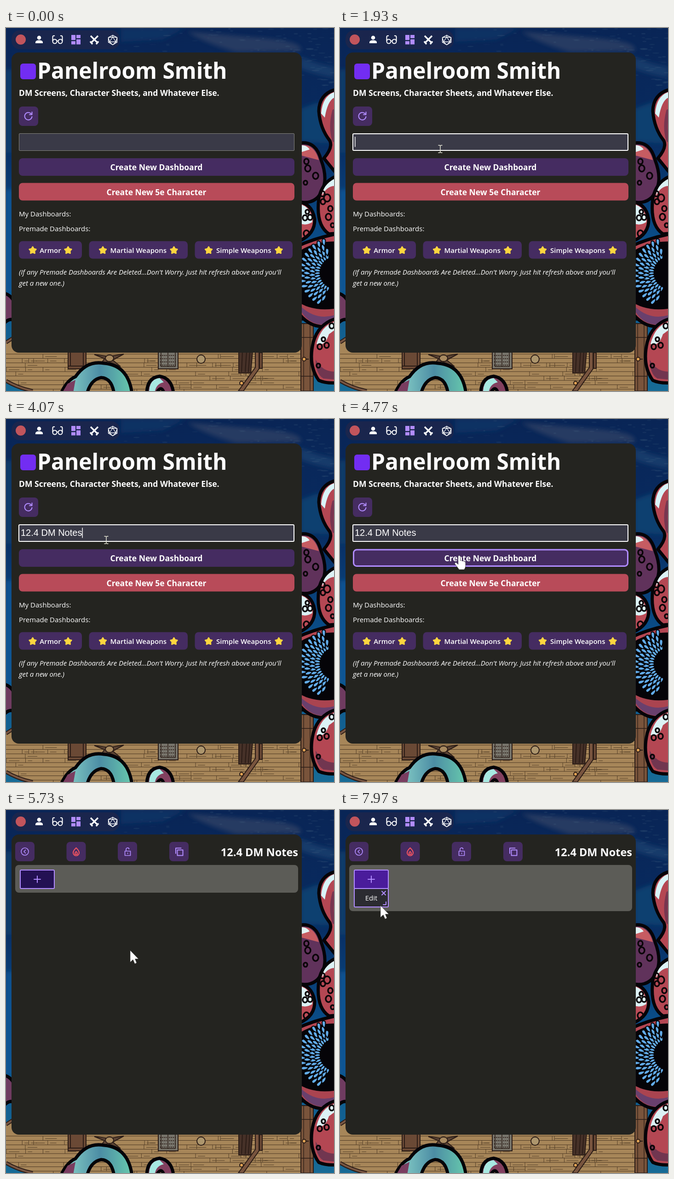
Animation, 713 px wide and 786 px high, one loop 8 s. Source, as an HTML page:

```html
<!DOCTYPE html>
<html lang="en">
<head>
<meta charset="utf-8">
<title>Panelroom Smith</title>
<style>
  html, body { margin: 0; width: 100%; height: 100%; overflow: hidden; background: #092757; }
  svg { display: block; width: 713px; height: 786px; }
  text { font: 15px "Open Sans", "Noto Sans", sans-serif; fill: #fff; white-space: pre; }
  .bold { font-weight: 700; font-size: 17.5px; }
  .semi { font-weight: 600; }
  .mid { text-anchor: middle; }
  .ink { stroke: #050408; stroke-width: 7; stroke-linejoin: round; stroke-linecap: round; }
  .ring { fill: none; stroke: #0a0508; stroke-width: 3.5; }
  .wood { stroke: #2b1c16; stroke-width: 2; }
  .btn { fill: #452c61; }
  .icon { fill: none; stroke: #b18cff; stroke-width: 2; stroke-linecap: round; stroke-linejoin: round; }
  .white { fill: none; stroke: #fff; stroke-width: 2; stroke-linejoin: round; }
</style>
</head>
<body>
<svg viewBox="0 0 713 786">
  <defs>
    <linearGradient id="sea" x2="0" y2="1">
      <stop offset="0" stop-color="#092556"/>
      <stop offset=".3" stop-color="#082b60"/>
      <stop offset=".6" stop-color="#0a4f8a"/>
      <stop offset="1" stop-color="#176b96"/>
    </linearGradient>
    <filter id="soft"><feGaussianBlur stdDeviation="5"/></filter>
    <linearGradient id="limb"><stop offset="0" stop-color="#8fd9cd"/><stop offset=".55" stop-color="#4c8da4"/><stop offset="1" stop-color="#67c9ad"/></linearGradient>
  </defs>

  <!-- Sea -->
  <rect width="713" height="786" fill="url(#sea)"/>
  <g filter="url(#soft)">
    <path d="M395 8Q470 14 560 22T640 50L500 52Q430 32 395 8Z" fill="#273a62"/>
    <path d="M640 62Q680 80 713 84V108Q670 100 640 88Z" fill="#153a6b"/>
    <path d="M250 0H390L340 25 250 30Z" fill="#0d3263"/>
    <path d="M640 175L680 160 705 250 640 246Z" fill="#0c3f70"/>
    <path d="M0 90H12V270H0Z" fill="#0a3f6c"/>
    <path d="M0 350H14V570H0Z" fill="#0d5594"/>
  </g>
  <g id="specks"></g>

  <!-- Ship -->
  <path d="M0 680L20 662H645V786H58Q20 780 0 764Z" fill="#a78659"/>
  <g id="planks" stroke="#4c3823"></g>
  <path d="M0 681L20 668M0 764Q25 779 58 786" fill="none" stroke="#2b1c16" stroke-width="8"/>
  <path d="M0 681L20 668M0 764Q25 779 58 786" fill="none" stroke="#795743" stroke-width="4"/>
  <g class="wood">
    <path d="M135 700H174V738H135Z" fill="#6a4935"/>
    <path d="M140 700V732H168V700M135 732H174" fill="none"/>
    <path d="M192 707L224 711 256 706 232 719 249 733 221 722 202 733 214 716Z" fill="#5e4636"/>
    <ellipse cx="225" cy="715" rx="9" ry="7" fill="#a88a60"/>
    <path d="M331 700H374V738H331Z" fill="#77746b"/>
    <path d="M337 700V733H368V700M352 700V733" fill="none" stroke-width="1.5"/>
    <path d="M335 709H371M335 716H371M335 723H371M335 730H371" stroke-dasharray="2 2"/>
    <circle cx="424" cy="717" r="9" fill="#ad966d"/>
    <path d="M506 700H536L532 747H506Z" fill="#463128"/>
    <path d="M514 700L512 745M523 700L520 745M530 700L527 745" fill="none"/>
    <path d="M542 700H550V738L516 786H505L542 735Z" fill="#79553f"/>
    <path d="M551 703H557V737H551Z" fill="#6a4935"/>
    <path d="M641 640H668V786H641Z" fill="#79543b"/>
    <path d="M647 640V786M661 640V786M641 670H668M641 754H668" fill="none" stroke-width="1.3"/>
    <circle cx="648" cy="717" r="4" fill="#e0a253"/><path d="M651 717H658"/>
    <circle cx="512" cy="769" r="4" fill="#e0a253"/>
  </g>

  <!-- Sea monster -->
  <g class="ink">
    <path d="M119 792Q132 763 151 755Q176 719 213 726Q266 730 274 792H235Q230 758 207 757Q184 761 176 792Z" fill="url(#limb)"/>
    <path d="M122 790L134 770 151 762 146 790Z" fill="#7a3d60" stroke="none"/>
    <path d="M306 792Q306 757 334 754Q360 758 364 790L344 792Q338 770 326 792Z" fill="#82405f"/>
    <path d="M311 790Q311 760 334 758L343 767Q326 770 323 790Z" fill="#a7e9e2" stroke="none"/>
    <path d="M-6 574Q8 576 16 590V632Q5 628 -6 642Z" fill="#6f3b60"/>

    <path d="M722 132Q681 140 680 180Q683 218 704 244Q711 259 691 282L722 320Z" fill="#b44753"/>
    <path d="M713 139Q688 148 685 185L693 194Q699 158 713 151Z" fill="#d9f4f8" stroke="none"/>
    <path d="M713 180Q704 215 713 243" fill="none" stroke="#783650" stroke-width="8"/>
    <path d="M630 251Q673 239 685 286Q699 323 689 348Q674 387 630 375Z" fill="#60325b"/>
    <path d="M638 254Q670 249 680 286L638 275Z" fill="#c65c62" stroke="none"/>
    <path d="M638 254Q653 252 660 263L638 270Z" fill="#e2f4f5" stroke="none"/>
    <path d="M630 376Q665 377 671 414Q672 446 638 461Z" fill="#bb4c57"/>
    <path d="M638 382Q662 385 666 420Q653 429 638 423Z" fill="#dcf2f5" stroke="none"/>
    <path d="M722 319Q687 332 680 369Q673 427 702 446L722 444Z" fill="#b44753"/>
    <path d="M713 327Q689 340 687 363Q697 343 713 342Z" fill="#dcf2f5" stroke="none"/>
    <path d="M632 473Q670 455 722 445V630H632Z" fill="#b44753"/>
    <path d="M632 491Q670 463 722 466V603Q670 608 632 583Z" fill="#050408"/>
    <path d="M632 587Q667 613 722 603V641Q665 661 632 612Z" fill="#aa4450"/>
    <path d="M642 604Q674 633 713 622V639Q666 652 642 614Z" fill="#69406d" stroke="none"/>
    <path d="M722 628Q680 638 668 680Q656 730 680 763Q695 770 722 768Z" fill="#b44753"/>
    <path d="M713 637Q685 645 675 684Q693 691 702 663L713 655Z" fill="#dcf2f5" stroke="none"/>
    <path d="M673 718Q674 750 690 759L713 761V744Q688 744 673 718Z" fill="#713650" stroke="none"/>
  </g>
  <g id="petals" fill="#62acea" stroke="#050408" stroke-width="2"></g>
  <ellipse cx="713" cy="530" rx="31" ry="34" fill="#050408"/>
  <g id="suckers" class="ring"></g>

  <!-- Navigation -->
  <rect x="12" y="5" width="235" height="41" rx="18" fill="#20264a" opacity=".75"/>
  <circle cx="32" cy="25" r="11" fill="#c2555c"/>
  <g fill="#fff">
    <circle cx="72" cy="21" r="4.3"/><path d="M64 33V31Q64 26.500 72 26.500T80 31V33Z"/>
  </g>
  <g class="white">
    <circle cx="106" cy="29" r="4.500"/><circle cx="118" cy="29" r="4.500"/>
    <path d="M101.500 28V19Q102 16 106 17M122.500 28V19Q122 16 118 17M110.500 28H113.500"/>
    <path d="M184 17L200 33M200 17L184 33M183 29L188 35M201 29L196 35" stroke-width="3.400"/>
    <path d="M232 15.500L241.500 20.500V31L232 36.500 222.500 31V20.500ZM232 19.500L239 30H225ZM232 15.500V19.500M222.500 20.500L232 19.500 241.500 20.500 239 30 232 36.500 225 30ZM222.500 31L225 30M241.500 31L239 30" stroke-width="1.300"/>
  </g>
  <path d="M142 15H151V26H142ZM153 15H162V22H153ZM142 28.500H151V35.500H142ZM153 24.500H162V35.500H153Z" fill="#b18cff"/>

  <rect x="12" y="53" width="631" height="650" rx="16" fill="#242420"/>

  <!-- Start screen -->
  <g id="home">
    <rect x="31" y="77" width="34" height="34" rx="6" fill="#722df2"/>
    <text x="68" y="110" style="font-size:47.800px" class="bold">Panelroom Smith</text>
    <text x="28" y="146.500" class="bold">DM Screens, Character Sheets, and Whatever Else.</text>
    <rect class="btn" x="28" y="170" width="42" height="42" rx="8"/>
    <path class="icon" d="M56.500 192A8 8 0 1 1 54.500 185.500L56.500 187.500M56.500 182V187.500H51" stroke-width="1.700"/>
    <rect id="field" fill="#3a3a47"/>
    <text id="entry" x="32" y="253" style="font:20px 'Liberation Sans',Arial,sans-serif"></text>
    <rect id="caret" y="235.500" width="1.500" height="22" fill="#fff"/>
    <rect class="btn" x="28" y="282" width="599" height="38" rx="8"/>
    <rect id="createRing" x="29.500" y="283" width="596" height="35.500" rx="7" fill="none" stroke="#b18cff" stroke-width="3"/>
    <text x="327" y="308" class="bold mid">Create New Dashboard</text>
    <rect x="28" y="335.500" width="599" height="38" rx="8" fill="#b84b59"/>
    <text x="327" y="361.500" class="bold mid">Create New 5e Character</text>
    <text x="28" y="408">My Dashboards:</text>
    <text x="28" y="440">Premade Dashboards:</text>
    <g id="premade"></g>
    <g font-style="italic">
      <text x="28" y="533.500" style="font-style:italic">(If any Premade Dashboards Are Deleted...Don't Worry. Just hit refresh above and you'll</text>
      <text x="28" y="557.500" style="font-style:italic">get a new one.)</text>
    </g>
  </g>

  <!-- Dashboard screen -->
  <g id="board">
    <g class="btn">
      <rect x="20" y="69" width="42" height="42" rx="8"/><rect x="131.500" y="69" width="42" height="42" rx="8"/>
      <rect x="243" y="69" width="42" height="42" rx="8"/><rect x="355" y="69" width="42" height="42" rx="8"/>
    </g>
    <g class="icon" style="stroke-width:1.700">
      <circle cx="41" cy="90" r="8"/><path d="M42.500 86.500L39 90 42.500 93.500"/>
      <path d="M152.500 82Q159 88 159 92.500A6.500 6.500 0 0 1 146 92.500Q146 88 152.500 82ZM152.500 90Q156 93 154.500 96H150.500Q149 93 152.500 90Z" stroke="#ee5361" stroke-width="2.200"/>
      <path d="M258.500 89H270.500V98.500H258.500ZM261 89V85.500A3.300 3.300 0 0 1 267.500 84.500M264.500 93V94.500"/>
      <path d="M372.500 86.500H384.500V98.500H372.500ZM369 94V82.500H380.500" stroke-width="2"/>
    </g>
    <text x="635" y="100" text-anchor="end" class="bold" style="font-size:23.500px">12.4 DM Notes</text>
    <rect id="tray" x="20" y="119" width="615" rx="8" fill="#5c5c57"/>
    <rect id="add" class="icon" x="31" y="130" width="74" height="40" rx="2"/>
    <path class="icon" d="M61 150H75M68 143V157"/>
    <g id="tile">
      <rect class="icon" x="31" y="170" width="74" height="40" rx="2" style="fill:#2b2b31"/>
      <text x="68" y="196" class="mid">Edit</text>
      <path class="icon" d="M91 176L99 184M99 176L91 184M94 205H100V199" stroke-width="1.700"/>
    </g>
  </g>

  <!-- Pointers, each with its hot spot at 0,0 -->
  <g id="pointer">
    <path id="arrow" d="M0 0V25.500L6 20 10 29 14 27 10.500 18.500H18Z" fill="#fff" stroke="#333" stroke-width=".6"/>
    <path id="beam" d="M-4.500 -8H-1.500L0 -7 1.500 -8H4.500M0 -7V7M-4.500 8H-1.500L0 7 1.500 8H4.500" fill="none" stroke="#e8e8d8" stroke-width="1.500"/>
    <path id="hand" d="M-2 2Q0 -1 2.500 2V12L5 11 7 13 9.500 12 11 14Q14 13 14 17V24Q13 29 11 31H0Q-4 25 -9 19Q-10 15 -6 16L-2 20Z" fill="#fff" stroke="#333" stroke-width=".6"/>
  </g>
</svg>

<script>
const $ = id => document.getElementById(id);
const show = (id, on) => $(id).style.display = on ? '' : 'none';
const set = (id, attrs) => Object.entries(attrs).forEach(([k, v]) => $(id).setAttribute(k, v));
const repeat = (n, draw) => Array.from({ length: n }, (_, i) => draw(i)).join('');

let seed = 7;
const random = () => (seed = seed * 16807 % 2147483647) / 2147483647;

// Scenery built from simple rules
$('specks').innerHTML = repeat(90, i => {
  const x = i < 65 ? 260 + random() * 453 : 642 + random() * 71;
  const y = i < 65 ? random() * 52 : 53 + random() * 80;
  return `<ellipse cx="${x}" cy="${y}" rx="${2 + random() * 7}" ry="1.5" fill="#52718c" opacity="${.05 + random() * .15}"/>`;
});
$('planks').innerHTML = repeat(9, row => {
  const y = 706 + row * 9.5, left = Math.max(0, (y - 764) * 2.7);
  return `<path d="M${left} ${y}H641" stroke-width="1.2"/>` +
    repeat(9, () => {
      const x = left + random() * (641 - left);
      return `<path d="M${x} ${y}v9.5m5 -4h${8 + random() * 18}" stroke-width=".9"/>`;
    });
});
$('petals').innerHTML = repeat(4, row => repeat(15, i => {
  const angle = 112 + i * 9.6 + row % 2 * 5, r = 36 + row * 11;
  const a = angle * Math.PI / 180;
  const x = 713 + r * Math.cos(a), y = 530 + r * Math.sin(a);
  return `<path d="M-8 0Q0 -6 8 -2Q9 3 5 4Q-2 4 -8 0Z" transform="translate(${x} ${y}) rotate(${angle + random() * 16})"/>`;
}));
$('suckers').innerHTML = [
  [653, 289, 5], [656, 304, 6], [673, 320, 6], [651, 335, 4], [655, 398, 4], [650, 411, 5], [661, 410, 5],
  [653, 445, 6], [688, 359, 5], [698, 368, 7], [689, 376, 5], [705, 391, 5], [701, 409, 6], [710, 427, 4],
  [708, 645, 5], [690, 674, 4], [682, 690, 5], [697, 687, 5], [679, 731, 4]
].map(([x, y, r]) => `<ellipse cx="${x}" cy="${y}" rx="${r}" ry="${r * 1.15}"/>`).join('');

const star = (x, y) => {
  const points = repeat(10, i => {
    const a = (i / 5 - .5) * Math.PI, r = i % 2 ? 4 : 7.5;
    return `${x + r * Math.cos(a)},${y + r * Math.sin(a)} `;
  });
  return `<polygon points="${points}" fill="#fcd53f" stroke="#fcd53f" stroke-width="3" stroke-linejoin="round"/>`;
};
$('premade').innerHTML = [[28, 137, 'Armor'], [180.5, 214.5, 'Martial Weapons'], [410.5, 212.5, 'Simple Weapons']]
  .map(([x, w, label]) => `<rect class="btn" x="${x}" y="461.5" width="${w}" height="38" rx="8"/>
    ${star(x + 30, 481.5)}${star(x + w - 30, 481.5)}
    <text x="${x + w / 2}" y="487" class="semi mid">${label}</text>`).join('');

// Timeline, in ms
const LOOP = 8000, FOCUS = 1600, TYPE = 2250, KEY = 130, BLUR = 5200, OPEN = 5600, ADD = 7350;
const NOTE = '12.4 DM Notes';
const PATH = [
  [450, 300, 810], [950, 218, 262], [4350, 218, 262], [4950, 270, 304], [5750, 270, 304],
  [6400, 84, 211], [6750, 84, 211], [7120, 70, 152], [7450, 70, 152], [7850, 88, 207]
];
const ruler = document.createElement('canvas').getContext('2d');
ruler.font = "20px 'Liberation Sans', Arial, sans-serif";

function pointerAt(t) {
  const i = PATH.findIndex(p => p[0] > t);
  if (i < 0) return PATH.at(-1).slice(1);
  if (i === 0) return PATH[0].slice(1);
  const [t0, x0, y0] = PATH[i - 1], [t1, x1, y1] = PATH[i];
  const u = (t - t0) / (t1 - t0), e = u * u * (3 - 2 * u);
  return [x0 + (x1 - x0) * e, y0 + (y1 - y0) * e];
}

function render(t) {
  const home = t < OPEN;
  const [x, y] = pointerAt(t);
  const over = (l, top, r, b) => x >= l && x <= r && y >= top && y <= b;
  show('home', home);
  show('board', !home);

  const focused = t >= FOCUS && t < BLUR;
  const overField = home && over(28, 228, 627, 265);
  const overCreate = home && over(28, 282, 627, 320);
  set('field', focused
    ? { x: 28, y: 229, width: 598, height: 36, rx: 2, stroke: '#fff', 'stroke-width': 2 }
    : { x: 28.5, y: 228.5, width: 598, height: 37, rx: 1.5, stroke: overField ? '#b9b9b0' : '#85857f', 'stroke-width': 1 });
  const typed = Math.max(0, Math.min(NOTE.length, Math.floor((t - TYPE) / KEY) + 1));
  const text = NOTE.slice(0, typed);
  $('entry').textContent = text;
  const lastKey = typed ? TYPE + (typed - 1) * KEY : FOCUS;
  show('caret', focused && (t - lastKey) % 1060 < 530);
  set('caret', { x: 32 + ruler.measureText(text).width });
  show('createRing', overCreate);

  const overAdd = !home && over(30, 129, 106, 171);
  const added = t >= ADD;
  show('tile', added);
  set('tray', { height: added ? 100 : 60 });
  $('add').style.fill = overAdd || added ? '#4a1c9b' : '#231153';

  const shape = overField ? 'beam' : overCreate || overAdd || home && over(28, 336, 627, 373) ? 'hand' : 'arrow';
  ['arrow', 'beam', 'hand'].forEach(id => show(id, id === shape));
  set('pointer', { transform: `translate(${x} ${y})` });
}

const start = performance.now();
function tick() {
  render((performance.now() - start) % LOOP);
  requestAnimationFrame(tick);
}
tick();
</script>
</body>
</html>
```
